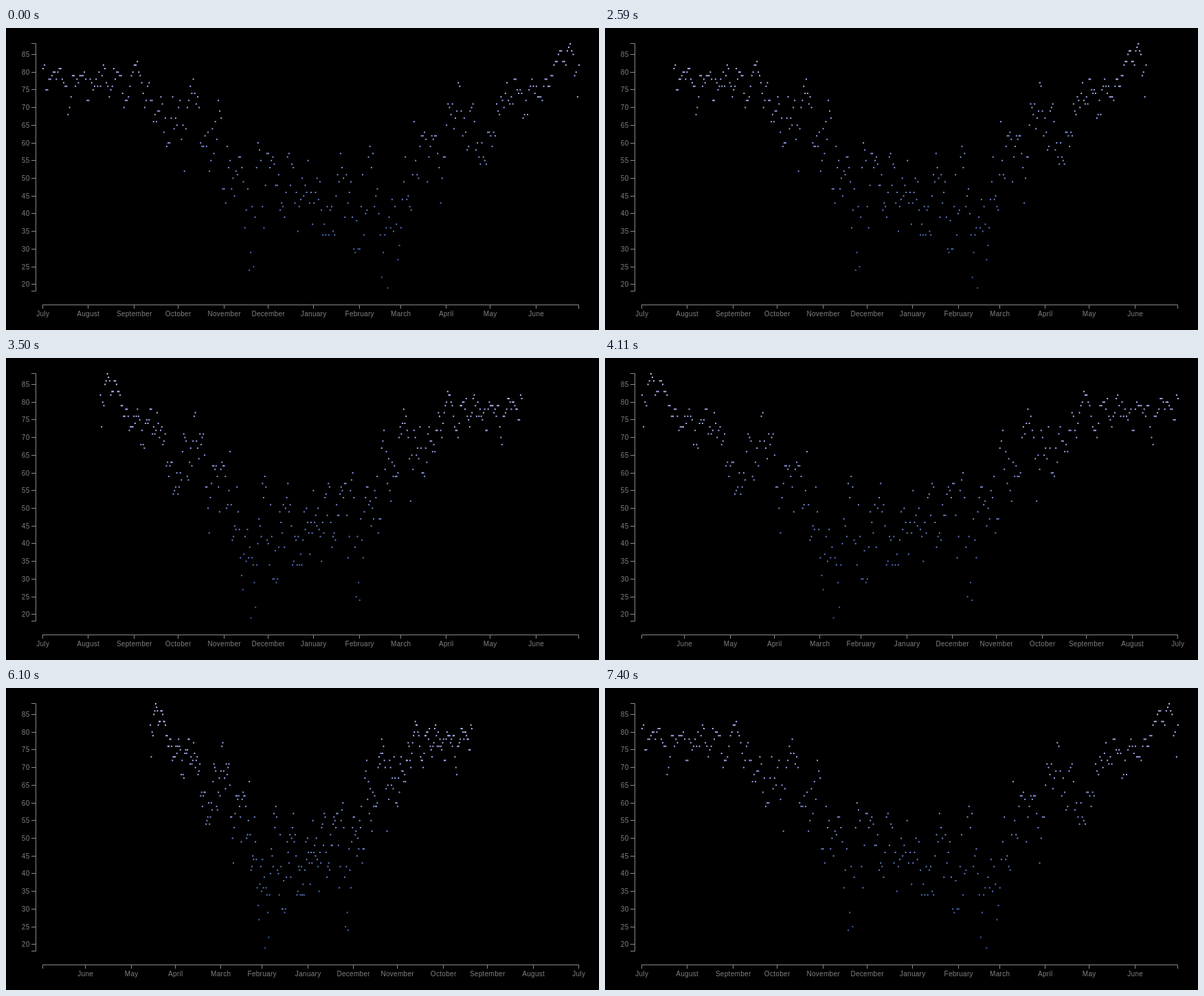
An HTML page with a canvas that plays this animation: 863x439 px, repeating every 9.53 s.

```html
<!DOCTYPE html>
<html lang="en">
<head>
<meta charset="utf-8">
<title>Daily temperatures</title>
<style>
  html, body { margin: 0; height: 100%; overflow: hidden; background: #000; }
  canvas { display: block; }
</style>
</head>
<body>
<canvas id="chart" width="863" height="439"></canvas>
<script>
const ctx = document.getElementById('chart').getContext('2d');
const LOOP = 9530, DURATION = 2000;
const FLIP = 2099, UNFLIP = 5364;            // start of each dot movement
const AXIS_FLIP = 4105, AXIS_UNFLIP = 7390;  // hard swap of the month axis
const LEFT = 53, TOP = 22, WIDTH = 780, HEIGHT = 360, DAYS = 364;
const MIN = 18, MAX = 88;

const MONTHS = [['July', 31], ['August', 31], ['September', 30], ['October', 31],
  ['November', 30], ['December', 31], ['January', 31], ['February', 28],
  ['March', 31], ['April', 30], ['May', 31], ['June', 30]];

// Temperature on every third day; the days between are varied around the line.
const KNOTS = [
  81, 75, 79, 78, 81, 76, 70, 79, 77, 79, 72, 77, 78, 76, 81, 73, 81, 80, 74, 72,
  79, 82, 79, 70, 77, 66, 69, 71, 59, 67, 67, 72, 52, 72, 78, 73, 59, 59, 55, 66,
  69, 47, 53, 50, 51, 53, 41, 29, 39, 58, 36, 57, 56, 48, 43, 46, 48, 43, 42, 45,
  55, 37, 50, 41, 34, 41, 34, 49, 50, 43, 39, 38, 42, 40, 59, 42, 40, 29, 19, 44,
  37, 36, 56, 42, 66, 50, 62, 49, 62, 62, 43, 56, 70, 64, 77, 62, 58, 70, 58, 54,
  55, 63, 63, 69, 72, 77, 73, 78, 75, 68, 75, 76, 73, 72, 78, 79, 83, 86, 83, 87,
  85, 73, 93];

let seed = 7;
const random = () => (seed = seed * 16807 % 2147483647) / 2147483647;
const clamp = (v, lo, hi) => Math.min(hi, Math.max(lo, v));
const mix = (a, b, k) => a + (b - a) * k;
const easeCubic = u => u < .5 ? 4 * u ** 3 : 1 - 4 * (1 - u) ** 3;
const yOf = temp => TOP + (MAX - temp) / (MAX - MIN) * HEIGHT;
const xOf = (day, flip) => LEFT + WIDTH * mix(day / DAYS, 1 - day / DAYS, flip);

function colorOf(temp) {
  const k = (temp - MIN) / (MAX - MIN);
  return `rgb(${mix(48, 192, k)}, ${mix(88, 192, k)}, ${mix(175, 255, k)})`;
}

const dots = Array.from({ length: DAYS + 1 }, (_, day) => {
  const i = Math.floor(day / 3), k = day % 3 / 3;
  const base = mix(KNOTS[i], KNOTS[i + 1] ?? KNOTS[i], k);
  const spread = k ? 2 + Math.max(0, 85 - base) * .2 : 0;
  const temp = clamp(Math.round(base + (random() * 2 - 1) * spread), MIN, MAX);
  return { day, y: yOf(temp), color: colorOf(temp) };
});

function line(...points) {
  ctx.beginPath();
  points.forEach(([x, y]) => ctx.lineTo(x, y));
  ctx.stroke();
}

function drawAxes(flip) {
  ctx.strokeStyle = '#888';
  ctx.fillStyle = '#808080';
  ctx.lineWidth = 1;
  ctx.font = '10px "Liberation Sans", Arial, sans-serif';
  ctx.letterSpacing = '0.3px';

  line([37, 22.5], [43.5, 22.5], [43.5, 382.5], [37, 382.5]);
  ctx.textAlign = 'right';
  for (let temp = 20; temp <= 85; temp += 5) {
    const y = Math.round(yOf(temp) + .5) + .5;
    line([37, y], [43, y]);
    ctx.fillText(temp, 34.5, y + 3.5);
  }

  line([53.5, 408], [53.5, 402.5], [833.5, 402.5], [833.5, 408]);
  ctx.textAlign = 'center';
  let day = 0;
  for (const [name, length] of MONTHS) {
    const x = Math.round(xOf(day, flip)) + .5;
    line([x, 402], [x, 408]);
    ctx.fillText(name, x + .2, 419);
    day += length;
  }
}

function draw(t) {
  const progress = start => easeCubic(clamp((t - start) / DURATION, 0, 1));
  const flip = progress(FLIP) - progress(UNFLIP);
  ctx.fillStyle = '#000';
  ctx.fillRect(0, 0, 863, 439);
  drawAxes(t >= AXIS_FLIP && t < AXIS_UNFLIP ? 1 : 0);
  for (const dot of dots) {
    ctx.fillStyle = dot.color;
    ctx.fillRect(xOf(dot.day, flip), dot.y, 2, 2);
  }
}

const begin = performance.now();
function frame() {
  draw((performance.now() - begin) % LOOP);
  requestAnimationFrame(frame);
}
frame();
</script>
</body>
</html>
```
